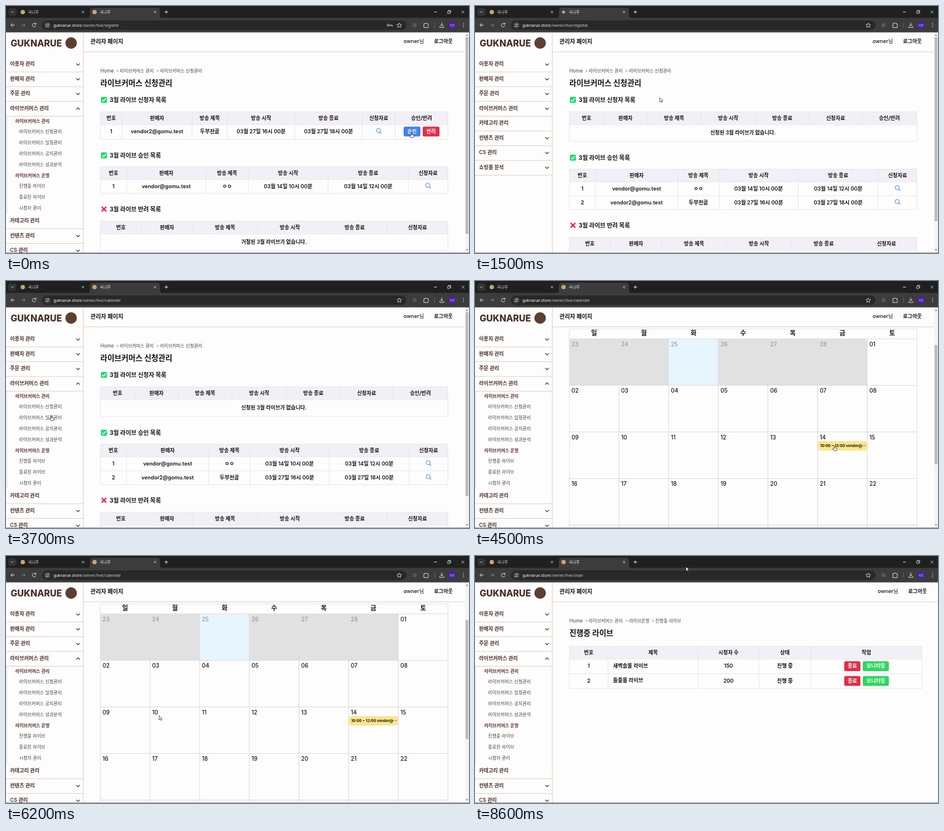
Animation, 800 px wide and 427 px high, one loop 8.7 s. Source, as an HTML page:

```html
<!DOCTYPE html>
<html lang="ko">
<head>
<meta charset="utf-8">
<title>라이브커머스 관리</title>
<style>
  html, body { margin: 0; width: 100%; height: 100%; overflow: hidden; background: #fdfdfd; }
  svg { display: block; width: 100vw; height: 100vh; }
  text { font-family: Inter, 'Noto Sans CJK KR', 'Noto Sans CJK', sans-serif; white-space: pre; }
  .ui text { font-family: Roboto, 'Noto Sans CJK KR', 'Noto Sans CJK', sans-serif; }
</style>
</head>
<body>
<svg viewBox="0 0 800 427"><g id="scene"></g><g id="pointer"></g></svg>
<script>
const LOOP = 8700;
const BRAND = 'GUKNARUE', SHOP = '국나루', HOST = 'guknarue.store', USER = 'owner';
const DISH = '두부전골', SELLER = 'vendor@gomu.test', SELLER2 = 'vendor2@gomu.test';
const PAGE = '#fdfdfd', INK = '#141414', BROWN = '#4b2e2a', TAN = '#e6cdba', GRID = '#e6e6ea';
const BLUE = '#4083ea', RED = '#dd3048', GREEN = '#2fd65f', YELLOW = '#fbe58b';

// Drawing helpers
const rect = (x, y, w, h, fill, r = 0, extra = '') =>
  `<rect x="${x}" y="${y}" width="${w}" height="${h}" rx="${r}" fill="${fill}" ${extra}/>`;
const circle = (x, y, r, fill, extra = '') =>
  `<circle cx="${x}" cy="${y}" r="${r}" fill="${fill}" ${extra}/>`;
const stroke = (d, color, width = 1, extra = '') =>
  `<path d="${d}" fill="none" stroke="${color}" stroke-width="${width}" ${extra}/>`;
const text = (s, x, cy, size, weight = 500, fill = INK, anchor = 'start') =>
  `<text x="${x}" y="${(cy + size * 0.36).toFixed(2)}" font-size="${size}" font-weight="${weight}" fill="${fill}" text-anchor="${anchor}">${s}</text>`;
const label = (s, x, cy, size, weight, fill) => text(s, x, cy, size, weight, fill, 'middle');
const cross = (x, y, r, color, w) =>
  stroke(`M${x - r} ${y - r}l${2 * r} ${2 * r}m0 ${-2 * r}l${-2 * r} ${2 * r}`, color, w);
const chevron = (y, up) =>
  stroke(up ? `M121.5 ${y + 1.5}l3-3 3 3` : `M121.5 ${y - 1.5}l3 3 3-3`, '#333', 1.1);
const button = (s, x, y, w, fill, h = 17) =>
  rect(x, y, w, h, fill, 2.5) + label(s, x + w / 2, y + h / 2 - 0.3, 8.7, 600, '#fff');
const magnifier = (x, y) =>
  circle(x - 0.5, y - 0.5, 3.6, 'none', `stroke="${BLUE}"`) + stroke(`M${x + 2} ${y + 2}l2.6 2.6`, BLUE, 1.1);

// Time helpers
const ease = p => p * p * (3 - 2 * p);
const progress = (t, from, to) => ease(Math.min(1, Math.max(0, (t - from) / (to - from))));

const path = [
  [0, 700, 219], [300, 700, 219], [900, 485, 102], [1100, 485, 102], [2000, 89, 237], [2200, 89, 237],
  [2600, 84, 178], [2800, 84, 178], [3400, 78, 233], [3800, 78, 233], [4500, 621, 285], [5100, 621, 285],
  [5650, 277, 277], [5850, 277, 277], [6150, 264.5, 276], [6300, 264.5, 276], [6950, 45, 309],
  [7300, 45, 309], [8100, 360, 120], [8500, 364.5, 18.5], [LOOP, 364.5, 18.5]
];
function pointerAt(t) {
  const i = path.findIndex(k => k[0] > t);
  const [a, b] = [path[i - 1], path[i]];
  const p = progress(t, a[0], b[0]);
  return [a[1] + (b[1] - a[1]) * p, a[2] + (b[2] - a[2]) * p];
}

function table(edges, top, heads, rows, rowHeight = 24) {
  const left = edges[0], right = edges[edges.length - 1], width = right - left;
  const bottom = top + 22 + rows.length * rowHeight;
  const mid = i => (edges[i] + edges[i + 1]) / 2;
  let out = rect(left, top, width, 22, '#f2f0f6');
  out += heads.map((h, i) => label(h, mid(i), top + 10.5, 8.9, 700)).join('');
  rows.forEach((row, r) => {
    const y = top + 22 + (r + 0.5) * rowHeight;
    out += typeof row === 'string'
      ? label(row, 463, y - 0.7, 8.9, 600)
      : row.map((cell, i) => typeof cell === 'function' ? cell(mid(i), y) : label(cell, mid(i), y - 0.6, 9.1, 600)).join('');
    out += stroke(`M${left} ${y + rowHeight / 2}H${right}`, GRID);
  });
  const inner = typeof rows[0] === 'string' ? top + 22 : bottom;
  edges.forEach((x, i) => {
    const end = i && i < edges.length - 1 ? inner : bottom;
    out += stroke(`M${x} ${top}V${end}`, GRID);
  });
  return out + stroke(`M${left} ${top}H${right}M${left} ${top + 22}H${right}`, GRID);
}

function pageTitle(title, crumbs) {
  return text('Home', 163, 112.5, 8.3, 400, '#444') +
    crumbs.map(([x, s]) => text('>', x, 112.5, 7.5, 400, '#777') + text(s, x + 6.5, 112.5, 7.7, 400, '#444')).join('') +
    text(title, 163, 133.5, 13.2, 700);
}

function listTitle(s, y, ok = true) {
  const icon = ok
    ? rect(164, y - 5, 10.5, 10.5, '#1fdc6c', 2) + stroke(`M166.3 ${y + 0.3}l2.2 2.3 4-5`, '#fff', 1.5)
    : cross(169.3, y + 0.2, 4, '#ee2456', 2.4);
  return icon + text(s, 179, y, 10.2, 700);
}

const LIST_HEADS = ['번호', '판매자', '방송 제목', '방송 시작', '방송 종료', '신청자료'];
const EARLY = ['03월 14일 10시 00분', '03월 14일 12시 00분'];
const LATE = ['03월 27일 16시 00분', '03월 27일 18시 00분'];
const REJECTED_EDGES = [163, 234, 322.5, 434.5, 546.5, 658.5, 763.5];
const decision = (x, y) => button('승인', 687, y - 9.3, 29, BLUE) + button('반려', 720, y - 9.3, 29, RED);

function registerPage(approved) {
  const first = ['1', SELLER, 'ㅇㅇ', ...EARLY, (x, y) => magnifier(x, y - 1.5)];
  const heads = [...LIST_HEADS, '승인/반려'];
  const shift = approved ? 4 : 0;
  const rejectedY = approved ? 379 : 351;
  return pageTitle('라이브커머스 신청관리', [[190, '라이브커머스 관리'], [259.5, '라이브커머스 신청관리']]) +
    listTitle('3월 라이브 신청자 목록', 162) +
    (approved
      ? table([163, 222.5, 297.5, 390.5, 484.5, 577.5, 668.5, 763.5], 183, heads, ['신청된 3월 라이브가 없습니다.'], 29)
      : table([163, 200.5, 321.5, 382.5, 499, 615.5, 672.5, 763.5], 183, heads,
        [['1', SELLER2, DISH, ...LATE, (x, y) => magnifier(x, y - 2), decision]], 25.5)) +
    listTitle('3월 라이브 승인 목록', 258 + shift) +
    (approved
      ? table([163, 208, 350.5, 421.5, 558.5, 696.5, 763.5], 282, LIST_HEADS,
        [first, ['2', SELLER2, DISH, ...LATE, (x, y) => magnifier(x, y - 1.5)]])
      : table([163, 208.5, 345.5, 418.5, 556.5, 695, 763.5], 278, LIST_HEADS, [first])) +
    listTitle('3월 라이브 반려 목록', rejectedY, false) +
    table(REJECTED_EDGES, rejectedY + 21, LIST_HEADS, ['거절된 3월 라이브가 없습니다.'], 29);
}

function calendarPage(scroll) {
  const left = 163, top = 204, w = 85.8, h = 80.5;
  let out = pageTitle('라이브커머스 일정관리', [[190, '라이브커머스 관리'], [259.5, '라이브커머스 일정관리']]);
  [...'일월화수목금토'].forEach((d, i) => out += label(d, left + w * (i + 0.5), 194.5, 11, 600));
  for (let i = 0; i < 42; i++) {
    const date = new Date(Date.UTC(2025, 1, 23 + i));
    const x = left + w * (i % 7), y = top + h * Math.floor(i / 7);
    const outside = date.getUTCMonth() !== 2;
    const fill = i === 2 ? '#e7f5ff' : outside ? '#e1e1e1' : PAGE;
    out += rect(x, y, w, h, fill, 0, 'stroke="#dedede"') +
      text(String(date.getUTCDate()).padStart(2, '0'), x + 3.8, y + 9.2, 9.7, 500, outside ? '#999' : INK);
  }
  out += stroke(`M163 ${top}V187H763.6V${top}`, '#dedede');
  out += rect(592.5, 381, 84.5, 16, YELLOW, 4) + text('10:00 ~ 12:00 vendor@⋯', 596.5, 388.5, 6.4, 700);
  return `<g transform="translate(0 ${-scroll})">${out}</g>`;
}

function onAirPage() {
  const actions = (x, y) => button('종료', 638, y - 8.7, 28, RED) + button('모니터링', 670, y - 8.7, 45, GREEN);
  const row = (n, name, viewers) =>
    [n, (x, y) => text(name, 238.5, y - 1, 9, 600), viewers, '진행 중', actions];
  return pageTitle('진행중 라이브', [[190, '라이브커머스 관리'], [259.5, '라이브운영'], [305, '진행중 라이브']]) +
    table([163, 230, 385.5, 490.5, 580.5, 772], 156, ['번호', '제목', '시청자 수', '상태', '작업'],
      [row('1', '새벽솔몰 라이브', '150'), row('2', '들풀몰 라이브', '200')], 25.5);
}

const MENU = ['이용자 관리', '판매자 관리', '주문 관리', '라이브커머스 관리', '카테고리 관리', '컨텐츠 관리', 'CS 관리', '쇼핑몰 분석'];
const SUBMENU = ['라이브커머스 관리', '라이브커머스 신청관리', '라이브커머스 일정관리', '라이브커머스 공지관리',
  '라이브커머스 성과분석', '라이브커머스 운영', '진행중 라이브', '종료된 라이브', '시청자 관리'];

function sidebar(open, [px, py]) {
  let out = rect(0, 45, 133, 382, PAGE) + stroke('M133.5 45V427', TAN) +
    text(BRAND, 8, 64, 15.4, 800, BROWN) + circle(112.5, 64, 10, '#5b4032');
  MENU.forEach((name, i) => {
    const top = 88.5 + i * 25.5 + (open && i > 3 ? 169 : 0);
    const hovered = px < 133 && py >= top && py < top + 25.5;
    if (hovered) out += rect(0, top + 1, 133, 25, '#fdf5ea');
    out += text(name, 7, top + 11.5, 8.8, 600, BROWN) + stroke(`M0 ${top + 25.5}H133`, TAN);
    if (i !== 4) out += chevron(top + 12.5, open && i === 3);
  });
  if (open) {
    out += stroke('M1.5 191V359', '#dcdcdc');
    SUBMENU.forEach((name, i) => {
      const group = i % 5 === 0;
      out += text(name, group ? 16 : 22.5, 198.8 + i * 18.8, 7.8, group ? 700 : 400, group ? '#5f3030' : '#4a4040');
    });
  }
  return out;
}

function pageHeader(shift) {
  return rect(134, 45, 666, 34, PAGE) + stroke('M134 79.2H800', TAN) +
    text('관리자 페이지', 146, 61.2, 9.8, 600) +
    text(USER + '님', 687 + shift, 61.2, 9, 500) + text('로그아웃', 739.5 + shift, 61.2, 8.8, 600);
}

const scrollbar = (top, height) => rect(793, 45, 7, 382, '#f4f4f4') + rect(794, top, 5, height, '#bdbdbd') +
  '<path d="M794.5 51.5l2-2.5 2 2.5zM794.5 420.5l2 2.5 2-2.5z" fill="#777"/>';

function detailModal() {
  const line = (name, value, y) =>
    text(`${name}: <tspan font-weight="400">${value}</tspan>`, 204.5, y, 8.8, 600);
  return rect(0, 45, 793, 382, 'rgba(0,0,0,.5)') + rect(188, 168.5, 417.5, 135.5, '#fff', 4) +
    '<path d="M206 189l7-3v10l-7-3z" fill="#d8334a"/>' + rect(213, 187, 2.5, 8, '#b9c5cf', 1) +
    stroke('M208.5 193l1.5 3.5', '#8899a6', 1.5) +
    text('방송 상세 정보', 222, 191, 11.2, 700) +
    line('방송 제목', 'ㅇㅇ', 213) + line('설명', 'ㅇㅇ', 225.8) +
    line('방송 시간', '2025-03-14 10:00 ~ 2025-03-14 12:00', 238.5) + line('판매자', SELLER, 251) +
    rect(204.5, 268, 49.5, 17.5, YELLOW, 3) + label('상태: <tspan font-weight="500">대기</tspan>', 229.3, 276.3, 8.7, 600) +
    button('닫기', 258.5, 266.5, 32.5, '#4b5563', 21);
}

const alertBox = pressed => `<g class="ui">` +
  rect(283.5, 43, 234.5, 75.5, '#1f1f1f', 5, 'stroke="#3a3a3a" stroke-width=".6"') +
  text(HOST + ' 내용:', 294.5, 59, 8.5, 500, '#e6e6e6') + text('승인 완료!', 294.5, 74.5, 7.1, 400, '#d0d0d0') +
  rect(474, 88, 33.5, 19.5, pressed ? '#abc5f0' : '#a8c7fa', 9.7) + label('확인', 490.7, 97.5, 7.5, 500, '#24446f') + '</g>';

function browser(url, loading, dimIcon, showKey, t) {
  const light = '#dedede', icon = (d, c = light, w = 1) => stroke(d, c, w);
  let out = rect(0, 0, 800, 24, '#1f2020') + rect(4, 4, 14, 13, '#333', 4) + icon('M9 9.5l2 2 2-2') +
    '<path d="M140 21q5 0 5-5V8q0-5 5-5h111q5 0 5 5v8q0 5 5 5z" fill="#3c3c3c"/>' +
    rect(0, 20.5, 800, 25.1, '#3c3c3c') + rect(62, 25, 630, 16.5, '#282828', 8.2);
  out += circle(29, 10.5, 3.8, '#c9a27c') + text(SHOP, 38, 10.7, 6.8, 400, light) + cross(133, 10.5, 1.9, light, 0.9);
  out += loading
    ? stroke('M0-3a3 3 0 0 1 3 3', '#a8c7fa', 1, `transform="translate(153 10.5) rotate(${Math.floor(t / 100) * 60})"`)
    : circle(153, 10.5, dimIcon ? 2.6 : 3.8, dimIcon ? '#b5aaa0' : '#c9a27c');
  out += text(SHOP, 162, 10.7, 6.8, 400, '#eee') + cross(257.5, 10.5, 1.9, light, 0.9) +
    icon('M274 10.5h6m-3-3v6') + icon('M739.5 10.5h5') +
    icon('M763 9h4v4h-4zM764.5 9V7.5h4v4H767', light, 0.8) + cross(789.5, 10.5, 2.2, light, 0.9);
  out += icon('M15 33H8.5m3-3l-3 3 3 3') + icon('M26.5 33h6.5m-3-3l3 3-3 3', '#858585');
  out += loading ? cross(48.5, 33, 2.4, light, 1) : icon('M51 31a3.1 3.1 0 1 0 .8 2.6M51.7 29v2.4h-2.4');
  out += circle(71.5, 33.2, 6, '#3c3c3c') + icon('M68.5 31.5h3m2 0h1M68.5 35h1m2 0h3', light, 0.9) +
    circle(73, 31.5, 1, 'none', `stroke="${light}" stroke-width=".7"`) +
    circle(70.3, 35, 1, 'none', `stroke="${light}" stroke-width=".7"`) +
    text(`${HOST}<tspan fill="#c4c4c4">/${USER}/live/${url}</tspan>`, 82, 33.3, 7.3, 400, '#f0f0f0');
  if (showKey) out += circle(660.5, 33.2, 1.8, 'none', `stroke="${light}"`) + icon('M662.5 33.2h5v2m-2-2v1.5');
  out += icon('M679.5 29.3l1.2 2.6 2.8.3-2.1 1.9.6 2.8-2.5-1.4-2.5 1.4.6-2.8-2.1-1.9 2.8-.3z', light, 0.9) +
    circle(706, 33.2, 3.5, '#5a5555') +
    icon('M722 30.5h2.5a1.3 1.3 0 0 1 2.6 0h2.3v2.5a1.3 1.3 0 0 1 0 2.4v1.9H722z') +
    icon('M740.5 28v10', '#606060') + icon('M753 28.8v5.5m-2.5-2.3l2.5 2.5 2.5-2.5M749.5 35v2h7v-2') +
    circle(771, 33, 6, '#4a19b8') + label('미르', 771, 33, 4.6, 500, '#eee') +
    [30, 33, 36].map(y => circle(790.5, y, 0.8, light)).join('');
  return `<g class="ui">${out}</g>`;
}

const ARROW = '<path d="M0 0v7.4l1.8-1.6 1.2 2.6 1.2-.6-1.1-2.5h2.3z" fill="#fff" stroke="#222" stroke-width=".7"/>';
const HAND = '<path d="M-.7 0q.7-.9 1.4 0v3.2l3 .7q.9.3.8 1.3l-.6 3.3h-4.6l-2.3-3q-.3-1 .8-.8l1.5 1z" fill="#fff" stroke="#222" stroke-width=".7"/>';

function scene(t, pointer) {
  const approved = t >= 1400, calendar = t >= 3800 && t < 7000, onAir = t >= 7000;
  const scroll = 104 * progress(t, 4000, 4400);
  const url = t < 3700 ? 'register' : onAir ? 'onair' : 'calender';
  const open = !approved || t >= 2700;
  return rect(0, 0, 800, 427, PAGE) +
    (onAir ? onAirPage() : calendar ? calendarPage(scroll) : registerPage(approved)) +
    pageHeader(onAir ? 9 : 0) + sidebar(open, pointer) +
    (t >= 4700 && t < 5800 ? detailModal() : '') +
    (onAir ? '' : calendar ? scrollbar(54 + scroll * 0.545, 206) : scrollbar(54, approved ? 318 : 340)) +
    rect(0, 426, 800, 1, '#9a9a9a') +
    browser(url, t >= 1000 && t < 1500, t >= 1500 && t < 2300, t < 1100, t) +
    (t >= 300 && t < 1100 ? alertBox(t >= 900) : '');
}

const sceneNode = document.getElementById('scene'), pointerNode = document.getElementById('pointer');
let shown = '';
function render() {
  const t = performance.now() % LOOP;
  const pointer = pointerAt(t), [x, y] = pointer;
  const markup = scene(t, pointer);
  if (markup !== shown) sceneNode.innerHTML = shown = markup;
  const hand = (x < 133 && y > 88) || t < 300 || (t > 4400 && t < 4700) || (t > 5600 && t < 5800);
  pointerNode.innerHTML = hand ? HAND : ARROW;
  pointerNode.setAttribute('transform', `translate(${x} ${y})`);
  requestAnimationFrame(render);
}
render();
</script>
</body>
</html>
```
